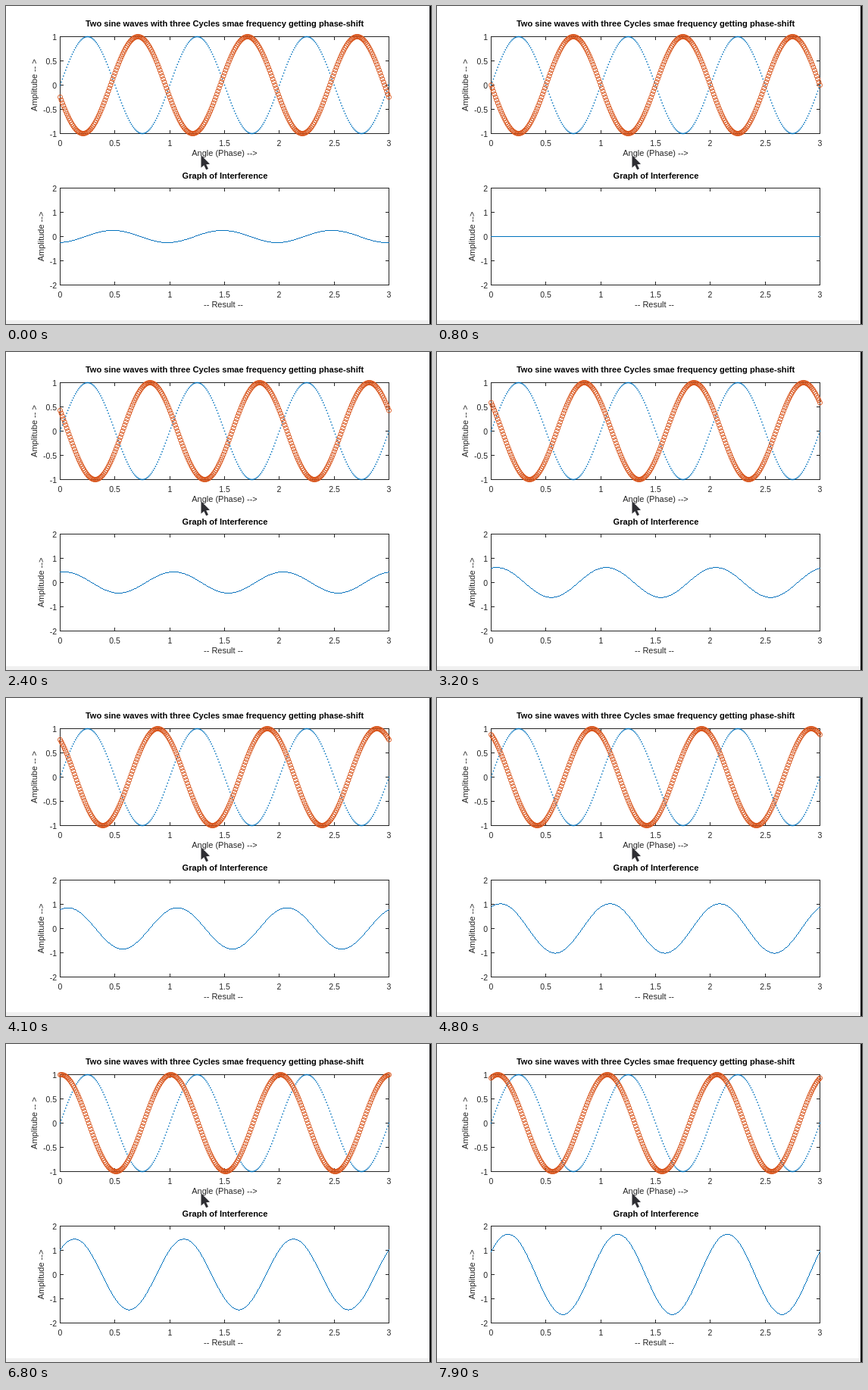
Animation of 561 by 420 pixels, one loop 8 s. Source, as an HTML page with a canvas:

```html
<!DOCTYPE html>
<html lang="en">
<head>
<meta charset="utf-8">
<title>Sine wave interference</title>
<style>
  html, body { margin: 0; width: 100%; height: 100%; overflow: hidden; background: #fff; }
  canvas { display: block; }
</style>
</head>
<body>
<canvas id="stage" width="561" height="420"></canvas>
<script>
const ctx = document.getElementById('stage').getContext('2d');
const LOOP = 8000;
const INK = '#262626', BLUE = '#0072bd', ORANGE = '#d95319';
const LEFT = 71.5, WIDTH = 434, HEIGHT = 128, CYCLES = 3, SAMPLES = 300;
const UPPER = { top: 40.5, max: 1, step: 0.5 };
const LOWER = { top: 240.5, max: 2, step: 1 };

// Bursts of phase steps, 200 ms apart: [start time, number of steps]
const BURSTS = [[100, 2], [600, 3], [1300, 2], [1800, 4], [2800, 3],
                [3500, 6], [4800, 4], [5700, 5], [6800, 5], [7900, 1]];

function delayAt(time) {
  let steps = 0;
  for (const [start, count] of BURSTS) {
    if (time >= start) steps += Math.min(count, Math.floor((time - start) / 200) + 1);
  }
  return 0.46 + steps * 0.01;
}

const wave = (x, delay = 0) => Math.sin(2 * Math.PI * (x - delay));
const toX = x => LEFT + x * WIDTH / CYCLES;
const toY = (axes, y) => axes.top + HEIGHT / 2 * (1 - y / axes.max);

function text(str, x, y, { size = 11, weight = 'normal', align = 'center', color = INK, turn = 0 } = {}) {
  ctx.save();
  ctx.translate(x, y);
  ctx.rotate(turn);
  ctx.font = `${weight} ${size}px "Liberation Sans", Arial, sans-serif`;
  ctx.textAlign = align;
  ctx.fillStyle = color;
  ctx.fillText(str, 0, 0);
  ctx.restore();
}

function line(x, y, dx, dy) {
  ctx.moveTo(x, y);
  ctx.lineTo(x + dx, y + dy);
}

function drawAxes(axes) {
  const right = LEFT + WIDTH, bottom = axes.top + HEIGHT, tick = 4.5;
  ctx.strokeStyle = INK;
  ctx.lineWidth = 1;
  ctx.strokeRect(LEFT, axes.top, WIDTH, HEIGHT);
  ctx.beginPath();
  for (let v = 0; v <= CYCLES; v += 0.5) {
    const x = Math.floor(toX(v)) + 0.5;
    line(x, axes.top, 0, tick);
    line(x, bottom, 0, -tick);
    text(String(v), x, bottom + 16, { size: 10.5 });
  }
  for (let v = -axes.max; v <= axes.max; v += axes.step) {
    const y = toY(axes, v);
    line(LEFT, y, tick, 0);
    line(right, y, -tick, 0);
    text(String(v), 67, y + 4, { size: 10.5, align: 'right' });
  }
  ctx.stroke();
}

function drawLabels() {
  const title = { size: 11.1, weight: 'bold', color: '#000' };
  const upward = { turn: -Math.PI / 2 };
  text('Two sine waves with three Cycles smae frequency getting phase-shift', 288.5, 27, title);
  text('Graph of Interference', 289, 228, title);
  text('Angle (Phase) -->', 288.5, 198);
  text('-- Result --', 287, 398);
  text('Amplitube -- >', 41, 104.5, upward);
  text('Amplitude -->', 50, 304.5, upward);
}

function drawWaves(delay) {
  ctx.fillStyle = BLUE;
  for (let i = 0; i <= SAMPLES; i++) {
    const x = i / 100;
    ctx.fillRect(toX(x) - 0.75, toY(UPPER, wave(x)) - 0.75, 1.5, 1.5);
  }
  ctx.strokeStyle = ORANGE;
  ctx.lineWidth = 1;
  for (let i = 0; i <= SAMPLES; i++) {
    const x = i / 100;
    ctx.beginPath();
    ctx.arc(toX(x), toY(UPPER, wave(x, delay)), 3, 0, 2 * Math.PI);
    ctx.stroke();
  }
}

// Crisp one-pixel curve, drawn column by column
function drawSum(delay) {
  const rowAt = px => {
    const x = px * CYCLES / WIDTH;
    return Math.floor(toY(LOWER, wave(x) + wave(x, delay)));
  };
  ctx.fillStyle = BLUE;
  for (let px = 0; px <= WIDTH; px++) {
    const from = rowAt(px - 0.5), to = rowAt(px + 0.5);
    ctx.fillRect(Math.floor(LEFT) + px, Math.min(from, to), 1, Math.max(1, Math.abs(to - from)));
  }
}

function drawPointer() {
  const outline = [[257.5, 197], [257.5, 213.5], [261.3, 210.2], [264.2, 216.3],
                   [267, 215], [264.2, 209.2], [269, 208.7]];
  ctx.beginPath();
  outline.forEach(([x, y]) => ctx.lineTo(x, y));
  ctx.closePath();
  ctx.fillStyle = '#2e2e33';
  ctx.fill();
}

function draw(time) {
  const delay = delayAt(time);
  ctx.fillStyle = '#fff';
  ctx.fillRect(0, 0, 561, 420);
  ctx.fillStyle = '#f0f0f0';
  ctx.fillRect(0, 415, 559, 5);
  ctx.fillStyle = '#0c0c10';
  ctx.fillRect(559, 0, 2, 420);
  drawAxes(UPPER);
  drawAxes(LOWER);
  drawLabels();
  drawWaves(delay);
  drawSum(delay);
  drawPointer();
}

const begin = performance.now();
function tick() {
  draw((performance.now() - begin) % LOOP);
  requestAnimationFrame(tick);
}
tick();
</script>
</body>
</html>
```
